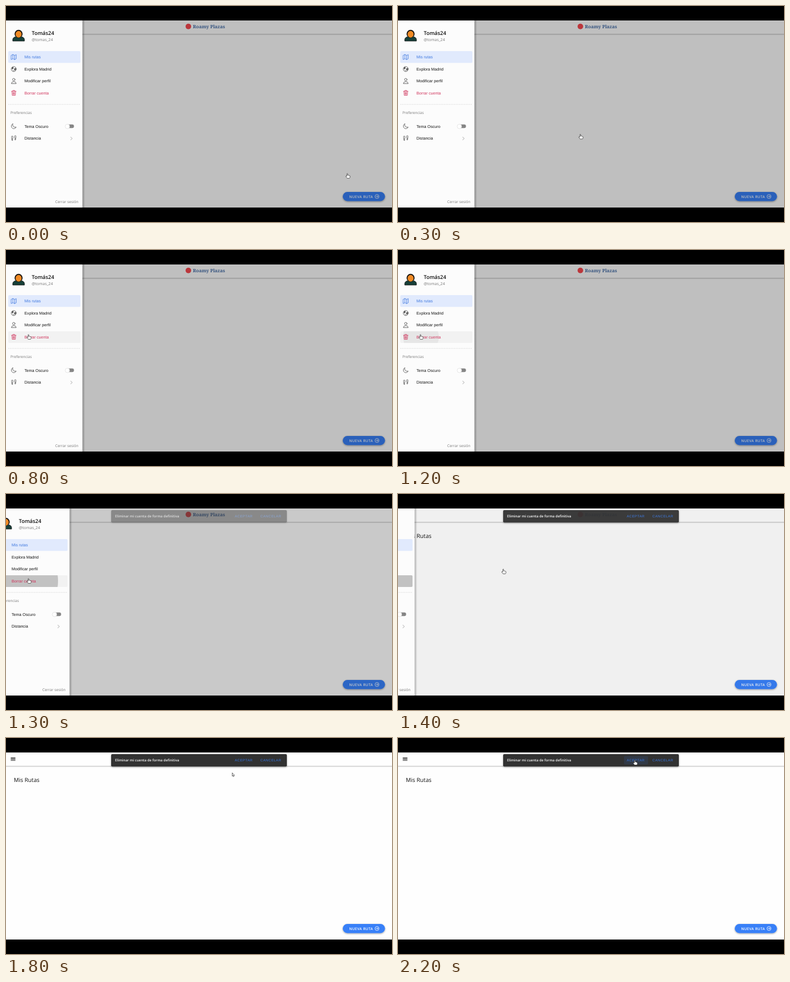
These frames come from a looping animation (690x388 px, 2.6 s). An HTML page:

```html
<!DOCTYPE html>
<html lang="es">
<head>
<meta charset="utf-8">
<title>Menú lateral</title>
<style>
  html, body { margin: 0; width: 100%; height: 100%; overflow: hidden; background: #000; }
  svg { display: block; width: 100%; height: 100%; }
  text { font-family: "Open Sans", "Noto Sans", sans-serif; text-rendering: geometricPrecision; white-space: pre; }
  .item { font: 7.2px "Liberation Sans", Arial, sans-serif; fill: #111; }
  .btn { font: 6.2px "Liberation Sans", Arial, sans-serif; fill: #3575e2; letter-spacing: .45px; }
  .icon { fill: none; stroke: #4a4a4a; stroke-width: .8; stroke-linecap: round; stroke-linejoin: round; }
  .blue { fill: #3f78df; }
  .red { fill: #d0345c; }
  .icon.blue { fill: none; stroke: #3f78df; }
  .icon.red { fill: none; stroke: #d0345c; }
</style>
</head>
<body>
<svg viewBox="0 0 690 388" preserveAspectRatio="none">
  <defs>
    <linearGradient id="edge">
      <stop offset="0" stop-color="#000" stop-opacity=".28"/>
      <stop offset="1" stop-color="#000" stop-opacity="0"/>
    </linearGradient>
    <filter id="soft" x="-20%" y="-50%" width="140%" height="220%">
      <feDropShadow dx="0" dy="1" stdDeviation="1.4" flood-opacity=".4"/>
    </filter>
    <clipPath id="row"><rect x="4" y="146" width="129" height="21" rx="2"/></clipPath>
  </defs>

  <!-- page -->
  <rect y="26" width="690" height="336" fill="#fefefe"/>
  <rect y="50.3" width="690" height="1" fill="#b5b5b5"/>
  <rect y="51.3" width="690" height="1" fill="#e8e8e8"/>
  <path d="M8.5 35.6h8.3M8.5 37.9h8.3M8.5 40.2h8.3" stroke="#222" stroke-width="1.1"/>
  <circle cx="326" cy="36.7" r="5" fill="#f9484e"/>
  <text x="334" y="40.3" style="font:600 8.3px 'Noto Serif',serif" fill="#4870aa">Roamy Plazas</text>
  <text x="14" y="79.2" font-size="10.2" fill="#111">Mis Rutas</text>
  <g filter="url(#soft)"><rect x="602" y="334" width="75.5" height="16.4" rx="8.2" fill="#3880f8"/></g>
  <text x="613.4" y="344.8" font-size="6.4" font-weight="600" letter-spacing=".35" fill="#fff">NUEVA RUTA</text>
  <g fill="none" stroke="#fff" stroke-width=".8">
    <circle cx="663.2" cy="342.2" r="3.6"/>
    <path d="M661.2 342.2h4M663.6 340.5l1.7 1.7-1.7 1.7"/>
  </g>
  <rect id="shade" y="26" width="690" height="336"/>

  <!-- drawer -->
  <g id="drawer">
    <rect x="136.5" y="26" width="5" height="336" fill="url(#edge)"/>
    <rect x="-10" y="26" width="146.5" height="336" fill="#fcfcfc"/>
    <path d="M12 63V60Q12.5 56 18 55H27Q32.500 56 33 60V63Z" fill="#173f38" stroke="#111" stroke-width=".8"/>
    <circle cx="22.500" cy="50" r="7.200" fill="#1b1712"/>
    <ellipse cx="22.500" cy="50.800" rx="5.300" ry="6" fill="#f08a24"/>
    <text x="46" y="52.400" font-size="9.400" font-weight="600" fill="#111">Tomás24</text>
    <text x="46" y="63" font-size="7" fill="#777">@tomas_24</text>

    <rect x="4" y="81" width="129" height="21.300" rx="2" fill="#e1eafd"/>
    <g clip-path="url(#row)">
      <rect id="hover" x="4" y="146" width="129" height="21" fill="#f2f2f2"/>
      <circle id="ripple" cx="41" cy="156"/>
    </g>
    <text class="item blue" x="33" y="94.200">Mis rutas</text>
    <text class="item" x="33" y="115.800">Explora Madrid</text>
    <text class="item" x="33" y="137.300">Modificar perfil</text>
    <text class="item red" x="33" y="158.900">Borrar cuenta</text>
    <path d="M4 176.800H133" stroke="#d2d2d2" stroke-width=".7" stroke-dasharray="2 1"/>
    <text x="8" y="194.300" font-size="6.600" fill="#777">Preferencias</text>
    <text class="item" x="33" y="218.600">Tema Oscuro</text>
    <text class="item" x="33" y="240.200">Distancia</text>
    <text x="88" y="354.200" font-size="6.700" fill="#777">Cerrar sesión</text>

    <path class="icon blue" d="M9.500 88.500L12.300 87.200 15.500 88.700 18.300 87.400V94.800L15.500 96.200 12.300 94.700 9.500 96ZM12.300 87.200V94.700M15.500 88.700V96.200"/>
    <circle class="icon" cx="13.900" cy="113.300" r="4.500"/>
    <path d="M10 111.200L13 109.300 13.500 111.500 11.800 114.300ZM14.600 112.500L17.600 111 17.400 114.800 15.300 116.600ZM12 115L13.700 115.600 13.500 117.400Z" fill="#4a4a4a"/>
    <circle class="icon" cx="13.900" cy="132.200" r="2.200"/>
    <path class="icon" d="M9.600 139Q9.800 135.800 13.900 135.800T18.200 139Z"/>
    <path class="icon red" d="M9.800 153.200H18M12.200 153V151.700H15.600V153M10.600 153.300L11.100 160.500H16.700L17.200 153.300M12.500 155L12.700 159M13.900 155V159M15.300 155L15.100 159"/>
    <path class="icon" d="M12 211.600Q8.800 213.500 9.700 217 11 220.800 14.800 220.300 17.300 219.700 18.200 217.600 14.700 218.400 12.800 216.200 11.300 214.200 12 211.600Z"/>
    <path class="icon" d="M10 236Q9.300 233.800 11 233.500 12.800 233.600 12.500 236.500L12 238.500 10.400 238.300ZM10.600 239.800L12 240Q12 242 11.100 241.800 10.300 241.500 10.600 239.800ZM17.800 235Q18.300 232.800 16.700 232.600 15 232.800 15.300 235.500L15.800 237.500 17.400 237.300ZM17.200 238.800L15.800 239Q15.800 241 16.700 240.800 17.500 240.500 17.200 238.800Z"/>
    <rect x="108" y="212.800" width="13.500" height="6.400" rx="3.200" fill="#858585"/>
    <circle cx="109.800" cy="216.300" r="4" fill="#fff" stroke="#d4d4d4" stroke-width=".6"/>
    <path class="icon" d="M115.700 235.300L118.400 238 115.700 240.700" stroke-opacity=".6"/>
  </g>

  <!-- toast -->
  <g id="toast">
    <rect x="188" y="29" width="314" height="22.300" rx="2" fill="#333" filter="url(#soft)"/>
    <text x="195" y="42.400" font-size="6.200" font-weight="600" fill="#fff">Eliminar mi cuenta de forma definitiva</text>
    <rect id="accept" x="404" y="32.500" width="43" height="15" rx="2" fill="#3880ff" fill-opacity=".1"/>
    <text class="btn" x="409" y="42.300">ACEPTAR</text>
    <text class="btn" x="454.800" y="42.300">CANCELAR</text>
  </g>

  <rect width="690" height="26"/>
  <rect y="362" width="690" height="26"/>

  <g id="cursor" fill="#fff" stroke="#222" stroke-width=".7" stroke-linejoin="round">
    <path id="hand" d="M-1.600 1V-3.600Q-.900-5 -.100-3.600V-1Q1-1.600 1.500-.700 2.600-1 2.900-.100 4-.200 4 1V2.200Q3.900 3.400 3 4.400H-1.200L-3.700 1.200Q-3.500 0 -2.500.500Z"/>
    <path id="arrow" d="M-1.600-3.400V2.500L-.300 1.400.600 3.300 1.600 2.800.800 1H2.400Z"/>
  </g>
</svg>
<script>
const LOOP = 2600, STEP = 100, WIDTH = 137;
const el = id => document.getElementById(id);
const show = (id, on) => el(id).setAttribute('visibility', on ? 'visible' : 'hidden');

// keys: [time, value, ...]; linear between neighbours, held at both ends
function track(keys, t) {
  const n = keys.findIndex(k => k[0] > t);
  if (n === 0) return keys[0].slice(1);
  if (n < 0) return keys[keys.length - 1].slice(1);
  const a = keys[n - 1], b = keys[n], k = (t - a[0]) / (b[0] - a[0]);
  return a.slice(1).map((v, i) => v + (b[i + 1] - v) * k);
}

const pointer = [
  [0, 611, 305], [400, 232, 211], [500, 232, 211], [600, 143, 174],
  [700, 75, 160], [800, 41, 156], [1300, 41, 156], [1400, 189, 139],
  [1500, 196, 134], [1700, 196, 134], [1800, 406, 66], [2200, 424, 44]
];
const slide = [[1200, 0], [1300, 23], [1400, 107], [1500, 135], [1600, 145]];
const fade = [[1200, 0], [1300, .42], [1400, .95], [1500, 1]];
const wave = [[1100, 0, 0], [1200, 32, .05], [1300, 75, .2], [1400, 110, .2]];

function draw(time) {
  const t = Math.floor(time % LOOP / STEP) * STEP;
  const [x, y] = track(pointer, t);
  const [shift] = track(slide, t);
  const [radius, dark] = track(wave, t);

  el('drawer').setAttribute('transform', `translate(${-shift} 0)`);
  show('drawer', shift < 145);
  el('shade').setAttribute('opacity', .25 * Math.max(0, 1 - shift / WIDTH));
  el('ripple').setAttribute('r', radius);
  el('ripple').setAttribute('opacity', dark);
  el('toast').setAttribute('opacity', track(fade, t)[0]);
  el('cursor').setAttribute('transform', `translate(${x} ${y})`);
  show('hover', t >= 800);
  show('accept', t >= 2100);
  const plain = t >= 1800 && y > 51;
  show('hand', !plain);
  show('arrow', plain);
}

let start;
function tick(now) {
  start ??= now;
  draw(now - start);
  requestAnimationFrame(tick);
}
draw(0);
requestAnimationFrame(tick);
</script>
</body>
</html>
```
